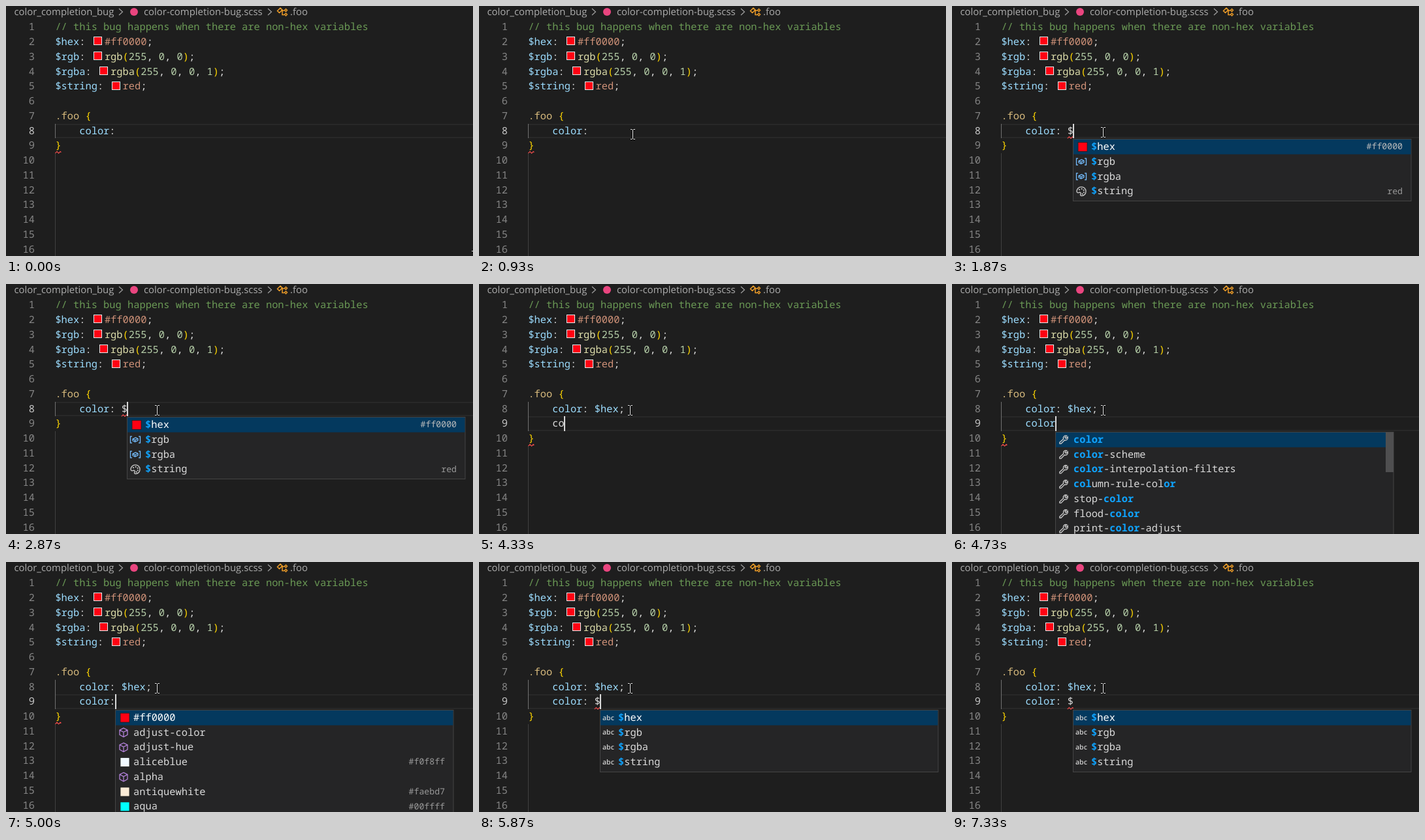
An HTML page for the animation above (7740 ms loop, 715 px wide and 384 px high).

```html
<!DOCTYPE html>
<html lang="en">
<head>
<meta charset="utf-8">
<title>Color completion</title>
<style>
  html, body { margin: 0; width: 100%; height: 100%; overflow: hidden; background: #1e1e1e; }
  svg { display: block; width: 715px; height: 384px; }
  text { white-space: pre; text-rendering: geometricPrecision; font: 500 15.36px "Noto Sans Mono", monospace; }
  .ui { font: 14.9px "Open Sans", sans-serif; }
  .abc { font: 600 10.5px "Open Sans", sans-serif; }
  .number { font-weight: 400; }
  .note { font-size: 13.2px; }
  .hit { font-weight: 700; fill: #0fa3ff; }
</style>
</head>
<body>
<svg viewBox="0 0 715 384">
  <g id="base"></g>
  <g id="live"></g>
  <g id="mouse" fill="none">
    <path d="M0.5 .5H2.5L3.5 1.5L4.5 .5H6.5M3.5 1.5V14.5M.5 15.5H2.5L3.5 14.5L4.5 15.5H6.5" stroke="#000" stroke-width="2.4"/>
    <path d="M0 .5H2.5L3.5 1.5L4.5 .5H7M3.5 1V15M0 15.5H2.5L3.5 14.5L4.5 15.5H7" stroke="#f4f4f4"/>
  </g>
</svg>
<script>
const LOOP = 7740, CH = 9.216, LEFT = 75.4, ROW = 22.77, POP_W = 518.5;
const RED = '#ff0013';
const C = {
  plain: '#dadada', prop: '#9cdcfe', str: '#ce9178', num: '#b5cea8',
  fn: '#dcdcaa', par: '#ffd700', sel: '#d7ba7d', com: '#6a9955'
};
const $ = id => document.getElementById(id);
const rowTop = n => 21.2 + (n - 1) * ROW;
const colX = c => LEFT + c * CH;

const esc = s => s.replace(/&/g, '&amp;').replace(/</g, '&lt;');
const text = (x, y, s, fill, more = '') => `<text x="${x}" y="${y}" fill="${fill}" ${more}>${esc(s)}</text>`;
const rect = (x, y, w, h, fill, more = '') =>
  `<rect x="${x}" y="${y}" width="${w}" height="${h}" fill="${fill}" ${more}/>`;
const path = (d, stroke, w = 1, more = '') =>
  `<path d="${d}" fill="none" stroke="${stroke}" stroke-width="${w}" ${more}/>`;

// Last value whose start time has passed.
const pick = (list, t) => list.reduce((v, [at, x]) => (t >= at ? x : v), list[0][1]);

// Tokens are "kind|text"; "#" stands for a colour swatch.
function line(row, col, ...tokens) {
  let x = colX(col), out = '';
  for (const tok of tokens) {
    if (tok === '#') {
      const y = Math.floor(rowTop(row) + 3.9) + .5;
      out += rect(Math.floor(x + 3.8) + .5, y, 12, 12, RED, 'stroke="#eee"');
      x += 20.2;
      continue;
    }
    const [kind, s] = tok.split('|');
    out += text(x, rowTop(row) + 16, s, C[kind]);
    x += s.length * CH;
  }
  return out;
}

function squiggle(col, row) {
  const x = colX(col), y = rowTop(row) + ROW;
  return path(`M${x} ${y}l2.6 -2.6l2.6 2.6l2.6 -2.6l1.2 1.2`, '#f14c4c', 1.2);
}

const chevron = x => path(`M${x} 4l5.5 5l-5.5 5`, '#a0a0a0', 1.2);

function drawBase() {
  const ui = (x, s) => text(x, 14, s, '#adadad', 'class="ui"');
  return ui(12.4, 'color_completion_bug') + chevron(173)
    + '<circle cx="196" cy="9" r="6" fill="#e9457f"/>'
    + ui(211, 'color-completion-bug.scss') + chevron(401)
    + path('M415.5 7.5l4.5 -4.5l3 3l-4.5 4.5zM421 7h5M423 7v6.5h3', '#ee9d28', 1.5)
    + path('M426.5 6.5l2 -2l2 2l-2 2zM426.5 13l2 -2l2 2l-2 2z', '#ee9d28', 1.4)
    + ui(435, '.foo')
    + line(1, 0, 'com|// this bug happens when there are non-hex variables')
    + line(2, 0, 'prop|$hex', 'plain|: ', '#', 'str|#ff0000', 'plain|;')
    + line(3, 0, 'prop|$rgb', 'plain|: ', '#', 'fn|rgb', 'par|(', 'num|255', 'plain|, ', 'num|0',
        'plain|, ', 'num|0', 'par|)', 'plain|;')
    + line(4, 0, 'prop|$rgba', 'plain|: ', '#', 'fn|rgba', 'par|(', 'num|255', 'plain|, ', 'num|0',
        'plain|, ', 'num|0', 'plain|, ', 'num|1', 'par|)', 'plain|;')
    + line(5, 0, 'prop|$string', 'plain|: ', '#', 'str|red', 'plain|;')
    + line(7, 0, 'sel|.foo ', 'par|{');
}

// Icons are drawn in a 16px box.
const icons = {
  wrench: path('M2 14.2L1.8 12.2L7.6 6.8C6.6 3.6 9.4 1 12.6 2L10 4.6L11.6 6.2L14.2 3.6C15.2 7 12.4 9.6 9.4 8.6L4 14.2Z', '#c5c5c5', 1.4),
  cube: path('M8 1.2L14 4.2V11.4L8 14.8L2 11.4V4.2ZM2 4.2L8 7.4L14 4.2M8 7.4V14.8', '#b180d7', 1.3),
  variable: path('M3 3H.5V13H3M13 3H15.5V13H13', '#75beff', 1.3)
    + path('M4 7L8.5 4.8L12 6.4V9.2L7.5 11.4L4 9.6ZM4 7L7.5 8.6L12 6.4M7.5 8.6V11.4', '#75beff', 1.2),
  palette: path('M8 1.2C3.8 1.2 1 4.4 1 8C1 10 3 10.6 4.6 9.8C6.8 9 7.6 10.6 6.8 12.2C6 14 7 14.8 8.6 14.8C12.4 14.8 15 11.6 15 8C15 4 12 1.2 8 1.2Z', '#c5c5c5', 1.4)
    + [[5, 5.4], [8.6, 4.2], [11.6, 6.2], [11.8, 9.6], [9.6, 12]]
      .map(([x, y]) => `<circle cx="${x}" cy="${y}" r="1.1" fill="#c5c5c5"/>`).join(''),
  abc: text(-1, 11.5, 'abc', '#d0d0d0', 'class="abc"')
};
const icon = (name, x, y) => name[0] === '#'
  ? rect(x + 3, y + 1, 14, 14, name, 'stroke="#1e1e1e" stroke-width=".8"')
  : `<g transform="translate(${x} ${y})">${icons[name]}</g>`;

// Items: icon, label with matched parts in [brackets], note.
const vars = [
  [RED, '[$]hex', '#ff0000'], ['variable', '[$]rgb'], ['variable', '[$]rgba'], ['palette', '[$]string', 'red']
];
const words = vars.map(([, label]) => ['abc', label]);
const props = ['[color]', '[color]-scheme', '[color]-interpolation-filters', '[col]umn-rule-col[or]',
  'stop-[color]', 'flood-[color]', 'print-[color]-adjust'].map(s => ['wrench', s]);
const values = [
  [RED, '#ff0000'], ['cube', 'adjust-color'], ['cube', 'adjust-hue'], ['#f0f8ff', 'aliceblue', '#f0f8ff'],
  ['cube', 'alpha'], ['#faebd7', 'antiquewhite', '#faebd7'], ['#00ffff', 'aqua', '#00ffff']
];

function popup({ row, col, items, bar }) {
  const x = Math.floor(colX(col)), y = rowTop(row + 1) + .8, long = items.length > 4;
  let out = rect(x + .5, Math.round(y) + .5, POP_W - 1, long ? 270 : 95, '#252526', 'stroke="#454545"');
  out += rect(x + 1, Math.round(y) + 1, POP_W - 2, ROW, '#04395e');
  items.forEach(([kind, label, note], i) => {
    const top = y + .6 + i * ROW, fill = i ? C.plain : '#fff';
    const base = top + 16.2;
    out += icon(kind, x + 5, top + 3.6);
    let cx = x + 28;
    label.split(/[\[\]]/).forEach((part, k) => {
      if (part) out += text(cx, base, part, fill, k % 2 ? 'class="hit"' : '');
      cx += part.length * CH;
    });
    if (note) out += text(x + POP_W - 13.5, base - .6, note, i ? '#999' : '#bbb', 'class="note" text-anchor="end"');
  });
  if (bar) out += rect(x + POP_W - 12.5, Math.round(y) + 1, 12, 61, '#4f4f50');
  return out;
}

const popups = [
  [0, null],
  [1870, { row: 8, col: 12, items: vars }],
  [3200, null],
  [4670, { row: 9, col: 9, items: props }],
  [4730, { row: 9, col: 9, items: props, bar: true }],
  [4930, null],
  [5000, { row: 9, col: 10, items: values }],
  [5070, { row: 9, col: 10, items: values, bar: true }],
  [5470, { row: 9, col: 11, items: values, bar: true }],
  [5530, null],
  [5870, { row: 9, col: 12, items: words }]
];
const typed8 = [[0, 6], [1330, 7], [1800, 8], [3200, 11], [3530, 12]];
const typed9 = [[0, 0], [4270, 1], [4330, 2], [4470, 3], [4530, 4], [4600, 5], [4930, 6], [5470, 7], [5800, 8]];
const caretOn = [[0, 0], [1330, 1], [2330, 0], [2870, 1], [6330, 0], [6800, 1], [7330, 0]];
const braceError = [[0, 1], [1800, 0], [4270, 1], [5800, 0]];

function declaration(row, len) {
  const s = 'color: $hex;'.slice(0, len);
  return line(row, 4, `${len < 5 ? 'plain' : 'prop'}|${s.slice(0, 5)}`, `plain|${s.slice(5, 7)}`,
    `${len === 8 ? 'plain' : 'prop'}|${s.slice(7, 11)}`, `plain|${s.slice(11)}`);
}

function drawLive(t) {
  const active = t < 4070 ? 8 : 9, end = active + 1;
  const n8 = pick(typed8, t), n9 = pick(typed9, t);
  const top = Math.round(rowTop(active)), bottom = Math.round(rowTop(end));
  let out = rect(75, top, 640, 2, '#282828') + rect(75, bottom - 2, 640, 2, '#282828');
  out += rect(75, 181, 1, bottom - 181, '#707070');
  const below = Math.round(rowTop(end + 1));
  out += rect(75, below, 1, 384 - below, '#404040');
  for (let n = 1; n <= 16; n++) {
    out += text(44, rowTop(n) + 16, String(n), n === active ? '#c6c6c6' : '#858585',
      'class="number" text-anchor="end"');
  }
  out += declaration(8, n8);
  if (active === 9) out += declaration(9, n9);
  out += line(end, 0, 'par|}');
  if (pick(braceError, t)) out += squiggle(0, end);
  const len = active === 8 ? n8 : n9;
  if (len === 8) out += squiggle(11, active);
  const pop = pick(popups, t);
  if (pop) out += popup(pop);
  if (pick(caretOn, t)) out += rect(Math.floor(colX(4 + len)), top, 2, bottom - top, '#d8d8d8');
  return out;
}

function mousePos(t) {
  if (t < 270) return [713, 376];
  if (t >= 1070) return [228, 186];
  if (t >= 1000) return [231, 187];
  const p = Math.min(1, (Math.floor((t - 269) / 66) + 1) / 11);
  const e = p * p * (3 - 2 * p);
  return [Math.round(713 - 481 * e), Math.round(376 - 187 * e)];
}

$('base').innerHTML = drawBase();
let shown = '';
function frame(now) {
  const t = now % LOOP, live = drawLive(t);
  if (live !== shown) $('live').innerHTML = shown = live;
  $('mouse').setAttribute('transform', `translate(${mousePos(t)})`);
}
const start = performance.now();
function tick() {
  frame(performance.now() - start);
  requestAnimationFrame(tick);
}
tick();
</script>
</body>
</html>
```
